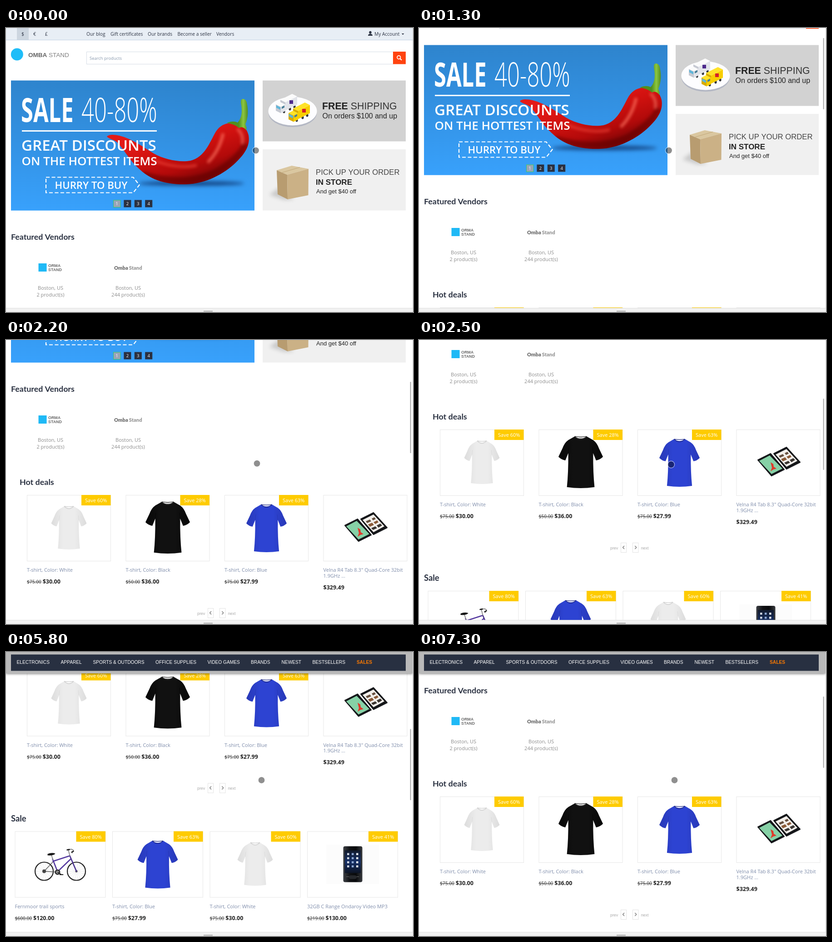
These frames come from a looping animation (896x625 px, 8 s). An HTML page with a canvas:

```html
<!DOCTYPE html>
<html lang="en">
<head>
<meta charset="utf-8">
<title>Store page</title>
<style>
html, body { margin: 0; width: 100%; height: 100%; overflow: hidden; background: #fff; }
canvas { display: block; width: 896px; height: 625px; }
</style>
</head>
<body>
<canvas id="stage" width="896" height="625"></canvas>
<script>
const ctx = document.getElementById('stage').getContext('2d');
const OPEN = '"Open Sans", sans-serif';
const ARIAL = '"Liberation Sans", Arial, sans-serif';
const LATO = 'Lato, sans-serif';
const INK = '#2b3242';

// ---------- helpers ----------
function text(str, x, y, size, color, { w = 400, font = OPEN, align = 'left' } = {}) {
  ctx.font = `${w} ${size}px ${font}`;
  ctx.fillStyle = color;
  ctx.textAlign = align;
  ctx.fillText(str, x, y);
  return ctx.measureText(str).width;
}
function rect(x, y, w, h, fill) {
  ctx.fillStyle = fill;
  ctx.fillRect(x, y, w, h);
}
function frame(x, y, w, h, color) {
  ctx.strokeStyle = color;
  ctx.lineWidth = 1;
  ctx.strokeRect(x, y, w, h);
}
function round(x, y, w, h, r, fill) {
  ctx.beginPath();
  ctx.roundRect(x, y, w, h, r);
  ctx.fillStyle = fill;
  ctx.fill();
}
function oval(x, y, rx, ry, fill) {
  ctx.beginPath();
  ctx.ellipse(x, y, rx, ry, 0, 0, 7);
  ctx.fillStyle = fill;
  ctx.fill();
}
function path(d, fill, stroke, width = 1) {
  const p = new Path2D(d);
  if (fill) { ctx.fillStyle = fill; ctx.fill(p); }
  if (stroke) { ctx.strokeStyle = stroke; ctx.lineWidth = width; ctx.stroke(p); }
}
function fade(x0, y0, x1, y1, ...colors) {
  const g = ctx.createLinearGradient(x0, y0, x1, y1);
  colors.forEach((c, i) => g.addColorStop(i / (colors.length - 1), c));
  return g;
}
function at(x, y, draw) {
  ctx.save();
  ctx.translate(x, y);
  draw();
  ctx.restore();
}

// ---------- product pictures, origin at the top centre of the card ----------
function shirt(top, half, h, colors, collar) {
  const pt = (a, b) => `${(a * half).toFixed(1)} ${(top + b * h).toFixed(1)}`;
  const d = `M${pt(-.27, .01)} Q${pt(0, .09)} ${pt(.27, .01)} L${pt(.56, .08)}
    Q${pt(.73, .13)} ${pt(.82, .24)} L${pt(1, .4)} Q${pt(.86, .46)} ${pt(.69, .47)} L${pt(.56, .33)}
    Q${pt(.55, .7)} ${pt(.62, .98)} Q${pt(0, 1.02)} ${pt(-.62, .98)} Q${pt(-.55, .7)} ${pt(-.56, .33)}
    L${pt(-.69, .47)} Q${pt(-.86, .46)} ${pt(-1, .4)} L${pt(-.82, .24)} Q${pt(-.73, .13)} ${pt(-.56, .08)} Z`;
  path(d, fade(-half, 0, half, 0, colors[1], colors[0], colors[0], colors[1]));
  path(`M${pt(-.27, .01)} Q${pt(0, .12)} ${pt(.27, .01)} M${pt(-.27, .01)} Q${pt(0, .03)} ${pt(.27, .01)}`, null, collar, 1.3);
  path(`M${pt(-.56, .33)} L${pt(-.53, .22)} M${pt(.56, .33)} L${pt(.53, .22)}`, null, colors[1], 1);
}
const white = () => shirt(24, 39, 96, ['#ececec', '#dcdcdc'], '#d0d0d0');
const blue = () => shirt(20, 44.5, 106, ['#2d43d2', '#2838b6'], '#1c2682');
const black = () => {
  shirt(14, 49, 115, ['#111', '#060606'], '#2a2a2a');
  rect(-4, 17, 8, 2.5, '#ddd');
};
function tablets() {
  ctx.lineJoin = 'round';
  path('M-45 67 L-17 53 L13 88 L-15 102 Z', '#15171a', '#15171a', 2);
  path('M-42 69 L-19 57 L9 86 L-15 98 Z', '#86d1a6');
  path('M-17 72 L-11 76 L-10 82 L-4 86 L-11 88 L-17 92 L-14 84 Z', '#e0392b');
  path('M-10 53 L18 39 L48 72 L18 87 Z', '#15171a', '#15171a', 2);
  path('M-6 55 L18 43 L42 69 L18 82 Z', '#f3f0ec');
  path('M1 58 L10 54 L13 58 L4 62 Z M14 52 L20 49 L23 53 L17 56 Z', '#67503f');
  path('M6 65 L15 61 L19 66 L10 70 Z M18 60 L26 56 L29 60 L22 64 Z', '#8a5a38');
  path('M13 73 L22 69 L26 73 L17 77 Z M25 67 L33 63 L37 67 L29 72 Z', '#3a3531');
}
function bike() {
  for (const x of [-35.5, 35.5]) {
    ctx.beginPath();
    for (let a = 0; a < 6; a += Math.PI / 9) {
      ctx.moveTo(x, 88);
      ctx.lineTo(x + 19 * Math.cos(a), 88 + 19 * Math.sin(a));
    }
    ctx.strokeStyle = '#d6d6d6'; ctx.lineWidth = .5; ctx.stroke();
    ctx.beginPath(); ctx.arc(x, 88, 20, 0, 7);
    ctx.strokeStyle = '#222'; ctx.lineWidth = 2.2; ctx.stroke();
    oval(x, 88, 2.5, 2.5, '#555');
  }
  ctx.lineCap = 'round';
  path('M-35.5 88 L-6 90 M-35.5 88 L-15 66', null, '#555', 1.4);
  path('M-17 61 L-6 89 L23 61 M-16 66 L21 54', null, '#55399f', 2.6);
  path('M21 54 L24 61 L35.5 88', null, '#4b3490', 2.6);
  path('M-20 51 L-16 63 M21 54 L18 42 Q24 37 29 42 L26 48', null, '#888', 1.8);
  path('M-28 50 Q-19 46 -11 49 Q-14 54 -28 53 Z', '#161616');
  path('M25 46 L29 44 M15 41 L20 40', null, '#161616', 2.4);
  oval(-6, 90, 6, 6, '#333');
  oval(-6, 90, 3, 3, '#aaa');
  path('M-6 90 L2 95 M-1 95.5 L6 95.5', null, '#222', 1.8);
  oval(-35.5, 88, 4, 4, '#444');
}
function icons(x, y, dx, dy, size, rows, colors) {
  for (let i = 0; i < rows * 3; i++)
    rect(x + i % 3 * dx, y + Math.floor(i / 3) * dy, size, size, colors[i % colors.length]);
}
function darkPlayer() {
  rect(-58, 30, 116, 86, '#fcfcfc');
  round(-20.5, 33, 42, 79, 4, fade(-20, 0, 21, 0, '#3a3d42', '#101114', '#08090b', '#36383c'));
  rect(-17, 42, 35, 50, fade(0, 42, 0, 92, '#121a2c', '#152f66', '#0d1424'));
  icons(-12, 48, 10, 9, 4.5, 4, ['#cfd6e2', '#8aa5d2', '#e4e8ee']);
  path('M-14 100 L14 100', null, '#666', 1);
  round(-8, 97, 17, 8, 4, '#26282c');
}
function redPlayer() {
  round(-27, 15.5, 54, 115, 6, fade(-27, 0, 27, 0, '#6c0c12', '#c9202b', '#a3141d', '#620a10'));
  round(-22, 24, 45, 55, 2, '#151113');
  icons(-15, 31, 12.5, 13, 6, 3, ['#d9d2d0', '#e9b7a6', '#e2dcd8', '#c9c1d8', '#f0b53c']);
  rect(-18, 72, 36, 3, '#5a2025');
  oval(0, 99, 15, 15, '#7c0d15');
  oval(0, 99, 13, 13, '#b51d27');
  oval(0, 99, 6, 6, '#d9545a');
  round(-23, 89, 9, 8, 3, '#d1878a');
  round(14, 89, 9, 8, 3, '#d1878a');
}
function seaTv() {
  oval(0, 107, 30, 3, '#26272b');
  rect(-5, 101, 10, 5, '#333');
  round(-53, 37, 106, 66, 1.5, '#17171b');
  rect(-50, 41, 100, 56, fade(0, 41, 0, 97, '#51517c', '#b58a72', '#f4b64d', '#9a5a31', '#3c2a35'));
  path('M-50 41 L10 41 L-10 52 L-50 60 Z', 'rgba(60,60,105,.6)');
  oval(21, 68, 10, 4, '#ffe07a');
  path('M-32 86 L-31 63 L-23 84 Z M-34 66 L-34 85 L-39 84 Z M-42 87 L-20 87 L-24 92 L-39 92 Z', '#17131a');
}
function cubeTv() {
  path('M-2 101 L-4 109 L-38 110 M-4 109 L27 117 M8 101 L4 108', null, '#555', 2);
  path('M-50 54 L50 28.5 L50 93 L-49 106 Z', '#17191f', '#3b3e44', 1.2);
  path('M-47 57 L47.5 33 L47.5 89 L-46 102 Z', fade(-47, 45, 47, 90, '#0e1220', '#1c3a58', '#0a0c12'));
  const colors = ['#2fa3df', '#79c143', '#eab72e', '#2c6fc6', '#e0533a', '#f3f3f3'];
  colors.forEach((c, i) => {
    const x = -30 + i * 13.5, y = 57 - i * 2.5 + (i % 2) * 9;
    path(`M${x - 5} ${y - 2} l5 -3 l5 2 l-5 3 Z`, '#dfe9ee');
    path(`M${x - 5} ${y - 2} l5 2 v7 l-5 -2 Z M${x + 5} ${y - 3} l-5 3 v7 l5 -3 Z`, c);
  });
  rect(-8, 78, 15, 15, '#f2f2f2');
}

// ---------- products ----------
const item = (name, old, price, save, art, stars) => ({ name: name.split('|'), old, price, save, art, stars });
const W = item('T-shirt, Color: White', '$75.00', '$30.00', '60', white);
const K = item('T-shirt, Color: Black', '$50.00', '$36.00', '28', black);
const B = item('T-shirt, Color: Blue', '$75.00', '$27.99', '63', blue);
const hot = [W, K, B, item('Velna R4 Tab 8.3" Quad-Core 32bit|1.9GHz ...', '', '$329.49', '', tablets)];
const sale = [
  item('Fernmoor trail sports', '$600.00', '$120.00', '80', bike), B, W,
  item('32GB C Range Ondaroy Video MP3', '$219.00', '$130.00', '41', darkPlayer),
  item('4GB K Range Ondaroy Video MP3', '$89.99', '$53.99', '40', redPlayer), K,
  item('43" Slate (42.7" Diag.) LCD 340 Range|TV', '', '', '25', seaTv, 4),
  item('58" Slate (57.5" Diag.) LED 2000 Range|Bright TV', '', '', '17', cubeTv, 4)
];

function star(x, y, full) {
  ctx.beginPath();
  for (let i = 0; i < 10; i++) {
    const r = i % 2 ? 2.3 : 5.2, a = i * Math.PI / 5 - Math.PI / 2;
    ctx.lineTo(x + r * Math.cos(a), y + r * Math.sin(a));
  }
  ctx.closePath();
  ctx.fillStyle = ctx.strokeStyle = '#fecb00';
  ctx.lineWidth = 1;
  full ? ctx.fill() : ctx.stroke();
}
function card(p, x, y, w) {
  rect(x, y, w, 146, '#fff');
  at(x + w / 2, y, p.art);
  frame(x + .5, y + .5, w - 1, 145, '#e7e7e7');
  if (p.save) {
    rect(x + w - 65, y, 64.5, 23, '#fecb00');
    text(`Save ${p.save}%`, x + w - 57, y + 16, 11, '#fff');
  }
  p.name.forEach((line, i) => text(line, x, y + 169 + i * 12.5, 11, '#7f8dab'));
  const base = y + 195 + (p.name.length - 1) * 12.5;
  let px = x;
  if (p.old) {
    const ow = text(p.old, x, base, 10.2, '#333');
    rect(x, base - 4, ow, 1, '#333');
    px += ow + 2.8;
  }
  text(p.price, px, base, 12.5, '#222', { w: 700 });
  if (p.stars) for (let i = 0; i < 5; i++) star(x + 5 + i * 14.7, base - 8, i < p.stars);
}

// ---------- page sections ----------
function topBar() {
  rect(0, 0, 896, 26, '#e8eef5');
  rect(0, 26, 896, 1, '#c3d2e4');
  rect(24, 0, 26, 26, '#cdd6e0');
  ['$', '€', '£'].forEach((c, i) => text(c, 37 + i * 26, 16.5, 10.2, INK, { align: 'center' }));
  const links = { 'Our blog': 177, 'Gift certificates': 230, 'Our brands': 312, 'Become a seller': 377.5, 'Vendors': 463 };
  for (const k in links) text(k, links[k], 16.5, 10.2, INK);
  oval(802, 9.8, 2.7, 3, INK);
  path('M797 17 Q797 13.2 802 13 Q807 13.2 807 17 Z', INK);
  text('My Account', 811, 16.5, 10.2, INK);
  path('M871 12 L876.5 12 L873.7 15 Z', INK);

  oval(24.3, 58, 13.5, 13.5, '#1fbdf8');
  const w = text('OMBA', 49, 63.5, 13.5, '#666', { w: 700, font: ARIAL });
  text('STAND', 49 + w + 3.7, 63.5, 13.5, '#808080', { font: ARIAL });
  frame(177.5, 52.5, 675, 27, '#d6dde6');
  text('Search products', 184, 69.5, 9.42, '#8798ad');
  rect(852, 52, 28, 27.5, '#ff430f');
  ctx.beginPath(); ctx.arc(864.8, 64.6, 3.7, 0, 7);
  ctx.strokeStyle = '#fff'; ctx.lineWidth = 1.8; ctx.stroke();
  path('M867.5 67.3 L871 70.8', null, '#fff', 2.3);
}
function pepper() {
  ctx.save();
  ctx.filter = 'blur(4px)';
  oval(408, 342, 116, 5, 'rgba(8,40,95,.75)');
  ctx.restore();
  const body = `M222 239 C226 234 238 234 250 237 C278 244 302 262 325 276 C350 290 382 296 406 292
    C438 284 448 252 462 228 C472 213 486 208 500 210 C514 205 530 218 534 236 C538 257 527 276 506 296
    C480 321 440 343 396 344 C350 345 316 333 291 308 C270 289 258 264 244 251 C236 245 227 244 222 239 Z`;
  path(body, fade(380, 220, 420, 345, '#e31a17', '#d0110f', '#b30a0a', '#720405'));
  ctx.save();
  ctx.clip(new Path2D(body));
  ctx.filter = 'blur(3px)';
  path('M300 322 Q390 350 460 318 Q510 290 528 255', null, 'rgba(90,0,0,.5)', 14);
  path('M478 232 Q470 270 444 296', null, 'rgba(255,120,100,.75)', 6);
  path('M322 290 Q378 312 420 302', null, 'rgba(255,90,75,.55)', 5);
  path('M509 222 Q524 234 520 256', null, 'rgba(255,140,120,.55)', 6);
  ctx.restore();
  path(`M486 209 Q500 203 510 208 Q523 194 517 165 Q516 157 521 156 Q528 156 530 164 Q536 190 527 212
    Q531 219 529 225 Q521 215 513 220 Q502 211 486 209 Z`, fade(512, 0, 533, 0, '#4f8f1f', '#8cc63e', '#4d8a22'));
}
// narrow face of the headline
function narrow(str, x, y, size, w) {
  at(x, y, () => { ctx.scale(.66, 1); text(str, 0, 0, size, '#fff', { w }); });
}
function saleBanner() {
  rect(11, 115.5, 536, 286.2, fade(0, 115, 0, 402, '#2e84cd', '#3392e4', '#38a1fc'));
  pepper();
  narrow('SALE', 33, 207, 74, 700);
  narrow('40-80%', 166, 207, 74, 300);
  rect(35, 225, 297, 3, '#fff');
  text('GREAT DISCOUNTS', 34, 270, 33.1, '#fff', { w: 600 });
  text('ON THE HOTTEST ITEMS', 34.5, 302, 26, '#fff', { w: 600 });
  ctx.save();
  ctx.setLineDash([8, 4.5]);
  path('M88 328.5 H280 L293.5 345.5 L280 362.5 H88 Z', null, '#fff', 2.2);
  ctx.restore();
  text('HURRY TO BUY', 107.5, 354, 22.2, '#fff', { w: 600 });
  for (let i = 0; i < 4; i++) {
    const x = 236 + i * 23.4;
    rect(x, 378.5, 16, 16, i ? '#2a3040' : '#9aa4b6');
    if (!i) frame(x + .5, 379, 15.5, 15.5, '#2fc96b');
    text(i + 1, x + 8, 390, 9.42, '#fff', { align: 'center' });
  }
}
// block seen from above: left corner, width of front, length, height
function block(x, y, front, len, h, top, side, face) {
  const f = front / 2, l = len / 2;
  path(`M${x} ${y} l${front} ${f} v${h} l${-front} ${-f} Z`, face);
  path(`M${x + front} ${y + f} l${len} ${-l} v${h} l${-len} ${l} Z`, side);
  path(`M${x} ${y} l${len} ${-l} l${front} ${f} l${-len} ${l} Z`, top);
}
function truck(x, y, light, mid, dark, mark) {
  at(x, y, () => {
    for (const [a, b] of [[21, 38], [34, 32], [44, 27]]) oval(a, b, 2.6, 3.4, '#33363c');
    block(13, 12, 11, 26, 18, light, mid, dark);
    block(3, 22, 11, 10, 14, light, mid, dark);
    path('M4 24 L13 28.5 L13 34 L4 29.5 Z', '#5fb6da');
    path('M16 27.5 L22 24.5 L22 29 L16 32 Z', '#4a7f98');
    rect(33, 13, 8, 8, mark);
  });
}
function sideBanners() {
  rect(565, 115.5, 315, 134, '#d2d2d2');
  oval(631, 187, 53, 31, '#b4b8c4');
  oval(631, 183, 53.5, 31.5, '#fdfdff');
  truck(591, 146, '#fbfbfb', '#e2e4ea', '#c6c9d2', '#4d2a8c');
  truck(619, 165, '#ffe229', '#f8ce00', '#d9ac00', '#d4202a');
  const w = text('FREE', 696, 178.5, 21.3, '#222', { w: 700, font: ARIAL });
  text('SHIPPING', 696 + w + 6, 178.5, 21.3, '#333', { font: ARIAL });
  text('On orders $100 and up', 696.5, 198.5, 16, '#222', { font: ARIAL });

  rect(565, 267, 315, 134.5, '#f0f0f0');
  ctx.save();
  ctx.filter = 'blur(4px)';
  path('M580 367 L600 352 L634 377 L612 378 Z', 'rgba(0,0,0,.16)');
  ctx.restore();
  path('M596 313 L629 303 L666 310 L619 323 Z', '#dac7a0');
  path('M596 313 L619 323 L620 377 L598 366 Z', '#b89c70');
  path('M619 323 L666 310 L665.5 368 L620 377 Z', '#cbb186');
  path('M608 318 L647 306.5', null, '#c2a97c', 1.2);
  text('PICK UP YOUR ORDER', 682, 322.5, 16.7, '#444', { font: ARIAL });
  text('IN STORE', 682, 344.5, 17, '#222', { w: 700, font: ARIAL });
  text('And get $40 off', 683, 363.5, 13, '#222', { font: ARIAL });
}
function vendors() {
  text('Featured Vendors', 11, 465.5, 17.8, INK, { w: 700, font: LATO });
  rect(71.5, 518, 18, 18, '#1fb9f6');
  text('ORMA', 93, 526, 8.9, '#6a6a6a', { w: 700, font: ARIAL });
  text('STAND', 93, 535, 8.9, '#6a6a6a', { w: 700, font: ARIAL });
  const w = text('Omba', 238, 531.5, 11.2, '#6b6b6b', { w: 900, font: LATO });
  text('Stand', 238 + w + 2, 531.5, 11.2, '#999', { w: 900, font: LATO });
  [['2', 98], ['244', 269]].forEach(([n, x]) => {
    text('Boston, US', x, 576, 11, '#8c8c8c', { align: 'center' });
    text(`${n} product(s)`, x, 591, 11, '#8c8c8c', { align: 'center' });
  });
}
function deals() {
  text('Hot deals', 30, 671, 17.9, INK, { w: 700, font: LATO });
  hot.forEach((p, i) => card(p, 46 + i * 217.5, 693, 185));
  text('prev', 421, 956.5, 8.8, '#a9a9a9', { font: ARIAL });
  text('next', 488.7, 956.5, 8.8, '#a9a9a9', { font: ARIAL });
  frame(444.5, 942.5, 12, 21, '#e3e3e3');
  frame(470.5, 942.5, 12.5, 21, '#e3e3e3');
  path('M452 949 L448.7 952.5 L452 956', null, '#888', 1.7);
  path('M475.3 949 L478.6 952.5 L475.3 956', null, '#888', 1.7);
}
function sales() {
  text('Sale', 11, 1026, 18.4, INK, { w: 700, font: LATO });
  sale.forEach((p, i) => card(p, 19.5 + i % 4 * 214.5, 1048 + Math.floor(i / 4) * 228.5, 200));
}
function menu(y) {
  at(0, y, () => {
    ctx.save();
    ctx.shadowColor = 'rgba(0,0,0,.5)';
    ctx.shadowBlur = 5;
    ctx.shadowOffsetY = 1;
    rect(0, 0, 895, 47, '#b9b9b9');
    ctx.restore();
    rect(11, 5.5, 869, 36, '#283041');
    const links = { 'ELECTRONICS': 23.5, 'APPAREL': 120.5, 'SPORTS & OUTDOORS': 191.5, 'OFFICE SUPPLIES': 329,
      'VIDEO GAMES': 443.5, 'BRANDS': 539, 'NEWEST': 606.5, 'BESTSELLERS': 674.5 };
    for (const k in links) text(k, links[k], 26, 10.2, '#fff', { font: ARIAL });
    text('SALES', 772, 26, 10.2, '#ff7a00', { w: 700, font: ARIAL });
  });
}

// ---------- timeline: [time, scroll offset] ----------
const scrolls = [
  [0, 0], [1000, 10], [1100, 28], [1200, 51], [1300, 78], [1400, 112], [1500, 147], [1600, 180], [1700, 207],
  [2000, 240], [2100, 295], [2200, 352], [2300, 408], [2400, 458], [2500, 496], [4900, 868],
  [5200, 800], [5600, 715], [5800, 653.5], [6000, 610], [6500, 565], [6600, 525], [6800, 475], [7100, 415], [7300, 375]
];
function pointer(t) {
  if (t < 2000) return [550, 269.5];
  if (t >= 4900) return [562.5, 282];
  const k = Math.min(1, (Math.floor((t - 2000) / 100) + 1) / 6);
  return [550 + 5 * k, 269.5 + 4.5 * k];
}

function draw() {
  const t = performance.now() % 8000;
  const s = scrolls.findLast(step => step[0] <= t)[1];
  rect(0, 0, 896, 625, '#fff');
  at(0, -s, () => {
    if (s < 120) topBar();
    if (s < 420) { saleBanner(); sideBanners(); }
    vendors();
    deals();
    sales();
  });
  if (t >= 5600) menu(t < 5800 ? -24 : 0);
  rect(895, 0, 1, 616, '#e4e4e4');
  if (t >= 1000 && !(t >= 4900 && t < 5200)) round(889.5, 2 + s * .256, 2.5, 157, 1.2, '#b5b5b5');

  const [x, y] = pointer(t);
  oval(x, y, 7, 7, 'rgba(0,0,0,.44)');
  ctx.beginPath(); ctx.arc(x, y, 7.6, 0, 7);
  ctx.strokeStyle = 'rgba(255,255,255,.6)'; ctx.lineWidth = 1.2; ctx.stroke();

  rect(0, 616, 896, 9, '#f1f1f1');
  rect(0, 616, 896, 1, '#dfdfdf');
  rect(435, 622.5, 20, 1.5, '#9a9a9a');
  requestAnimationFrame(draw);
}
requestAnimationFrame(draw);
</script>
</body>
</html>
```
